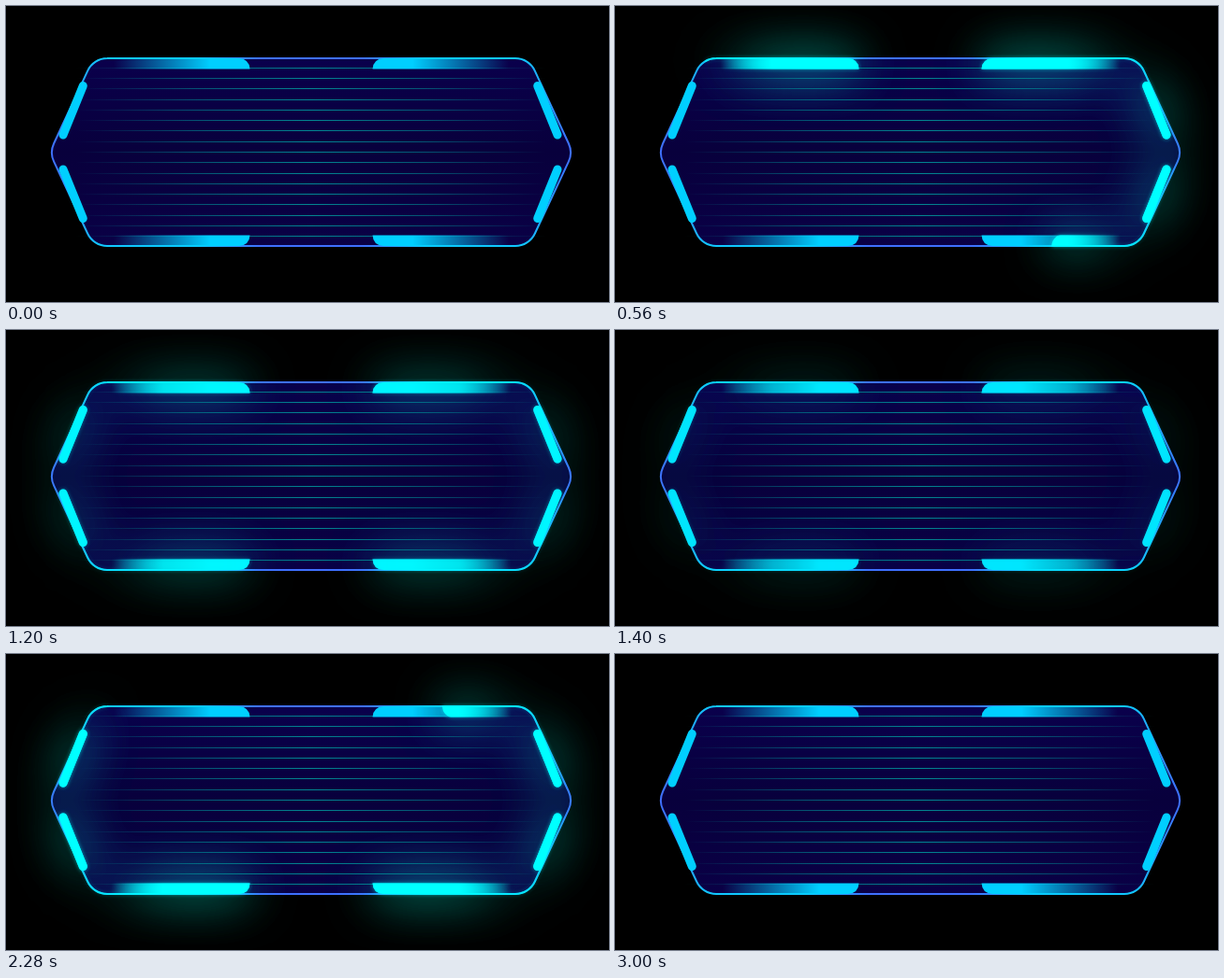
These frames come from a looping animation (644x317 px, 3200 ms). An HTML page with a canvas:

```html
<!DOCTYPE html>
<html lang="en">
<head>
<meta charset="utf-8">
<title>Neon panel</title>
<style>
html, body { margin: 0; width: 100%; height: 100%; overflow: hidden; background: #000; }
canvas { display: block; }
</style>
</head>
<body>
<canvas id="stage" width="644" height="317"></canvas>
<script>
const W = 644, H = 317, CX = 326, CY = 156.5;
const LOOP = 3200, STEP = 40, SWEEP = 1000, ERASE_AT = 2000;
const SPEED = 1.334; // sweep speed in px per ms
const TOP = 56, BOTTOM = 257, RADIUS = 23;

const stage = document.getElementById('stage').getContext('2d');

function layer() {
  const canvas = document.createElement('canvas');
  canvas.width = W;
  canvas.height = H;
  return canvas.getContext('2d');
}

function makeOutline() {
  const path = new Path2D();
  const corners = [[558.6, TOP], [605.4, 157], [558.6, BOTTOM], [93.4, BOTTOM], [46.6, 157], [93.4, TOP]];
  path.moveTo(108, TOP);
  corners.forEach(([x, y], i) => {
    const [nx, ny] = corners[(i + 1) % corners.length];
    path.arcTo(x, y, nx, ny, RADIUS);
  });
  path.closePath();
  return path;
}

const outline = makeOutline();
const OUTLINE_LENGTH = 1359;
const MASK_WIDTH = 25;

function gradientX(ctx, x0, x1, stops) {
  const g = ctx.createLinearGradient(x0, 0, x1, 0);
  stops.forEach(([at, color]) => g.addColorStop(at, color));
  return g;
}

// Runs draw for all four quadrants, mirrored about the given centre line.
function mirrored(ctx, cx, draw) {
  for (const sx of [1, -1]) {
    for (const sy of [1, -1]) {
      ctx.save();
      ctx.translate(cx, CY);
      ctx.scale(sx, sy);
      ctx.translate(-cx, -CY);
      draw();
      ctx.restore();
    }
  }
}

function drawBars(ctx, rgb, fadeStart, fadeEnd) {
  const solid = `rgb(${rgb})`;
  const fade = gradientX(ctx, fadeStart, fadeEnd, [[0, `rgba(${rgb},0)`], [1, solid]]);
  mirrored(ctx, CX, () => {
    ctx.fillStyle = fade;
    ctx.beginPath();
    ctx.moveTo(fadeStart, TOP);
    ctx.lineTo(249, TOP);
    ctx.quadraticCurveTo(260, TOP + 1, 260.5, 67.5);
    ctx.lineTo(fadeStart, 67.5);
    ctx.fill();
  });
  mirrored(ctx, CX - 1, () => {
    ctx.strokeStyle = solid;
    ctx.lineWidth = 9;
    ctx.lineCap = 'round';
    ctx.beginPath();
    ctx.moveTo(82.3, 85.5);
    ctx.lineTo(61, 138);
    ctx.stroke();
  });
}

function strokeOutline(ctx, side, corner, middle) {
  ctx.strokeStyle = gradientX(ctx, 50, 602, [
    [0, side], [0.09, corner], [0.28, corner], [0.4, middle],
    [0.6, middle], [0.72, corner], [0.91, corner], [1, side]
  ]);
  ctx.lineWidth = 2;
  ctx.stroke(outline);
}

function makeBase() {
  const ctx = layer();
  ctx.fillStyle = '#000';
  ctx.fillRect(0, 0, W, H);

  const fill = ctx.createLinearGradient(0, TOP, 0, BOTTOM);
  fill.addColorStop(0, '#0a004c');
  fill.addColorStop(0.5, '#08003c');
  fill.addColorStop(1, '#0a0046');
  ctx.fillStyle = fill;
  ctx.fill(outline);

  ctx.fillStyle = gradientX(ctx, 75, 577, [
    [0, 'rgba(0,150,155,0)'], [0.25, 'rgba(0,150,155,0.55)'], [0.5, 'rgba(0,150,155,0.9)'],
    [0.75, 'rgba(0,150,155,0.55)'], [1, 'rgba(0,150,155,0)']
  ]);
  for (let i = 0; i < 17; i++) ctx.fillRect(75, Math.floor(66.2 + i * 11.28), 502, 1);

  strokeOutline(ctx, '#3f70ff', '#10c8ff', '#3f70ff');
  drawBars(ctx, '0,207,255', 115, 218);
  return ctx.canvas;
}

function makeLit() {
  const ctx = layer();
  strokeOutline(ctx, 'rgba(0,255,255,0)', 'rgba(0,255,255,0.5)', 'rgba(0,255,255,0)');
  drawBars(ctx, '0,255,255', 112, 168);
  return ctx.canvas;
}

const base = makeBase();
const lit = makeLit();
const masked = layer();

// Keeps only the part of the lit layer along the outline between two distances.
function maskLit(from, to) {
  masked.globalCompositeOperation = 'copy';
  masked.drawImage(lit, 0, 0);
  masked.globalCompositeOperation = 'destination-in';
  masked.lineWidth = MASK_WIDTH;
  masked.lineCap = 'round';
  masked.lineJoin = 'round';
  masked.strokeStyle = '#000';
  masked.setLineDash([to - from, OUTLINE_LENGTH * 2]);
  masked.lineDashOffset = -from;
  masked.stroke(outline);
  return masked.canvas;
}

function drawGlow(image, alpha) {
  stage.save();
  stage.globalAlpha = alpha;

  // Wide halo: the image stays off stage, only its shadow lands on it.
  stage.shadowColor = 'rgba(0,255,228,0.65)';
  stage.shadowBlur = 52;
  stage.shadowOffsetX = W * 2;
  for (let pass = 0; pass < 2; pass++) stage.drawImage(image, -W * 2, 0);

  stage.shadowColor = 'rgba(0,255,255,0.6)';
  stage.shadowBlur = 4;
  stage.shadowOffsetX = 0;
  stage.drawImage(image, 0, 0);
  stage.restore();
}

// Two quick dips in brightness right after the sweep closes.
function flicker(t) {
  if (t <= 1000 || t >= 1480) return 1;
  return Math.abs(((t - 1000) % 240) / 120 - 1);
}

function render(time) {
  const t = Math.floor((time % LOOP) / STEP) * STEP;
  const travelled = elapsed => elapsed * SPEED - 3;
  stage.drawImage(base, 0, 0);

  if (t > 0 && t < SWEEP) {
    drawGlow(maskLit(0, travelled(t)), 1);
  } else if (t >= SWEEP && t <= ERASE_AT) {
    drawGlow(lit, flicker(t));
  } else if (t > ERASE_AT && t < ERASE_AT + SWEEP) {
    const end = OUTLINE_LENGTH - MASK_WIDTH / 2;
    drawGlow(maskLit(travelled(t - ERASE_AT), end), 1);
  }
}

let start;
function tick(now) {
  if (start === undefined) start = now;
  render(now - start);
  requestAnimationFrame(tick);
}
requestAnimationFrame(tick);
</script>
</body>
</html>
```
